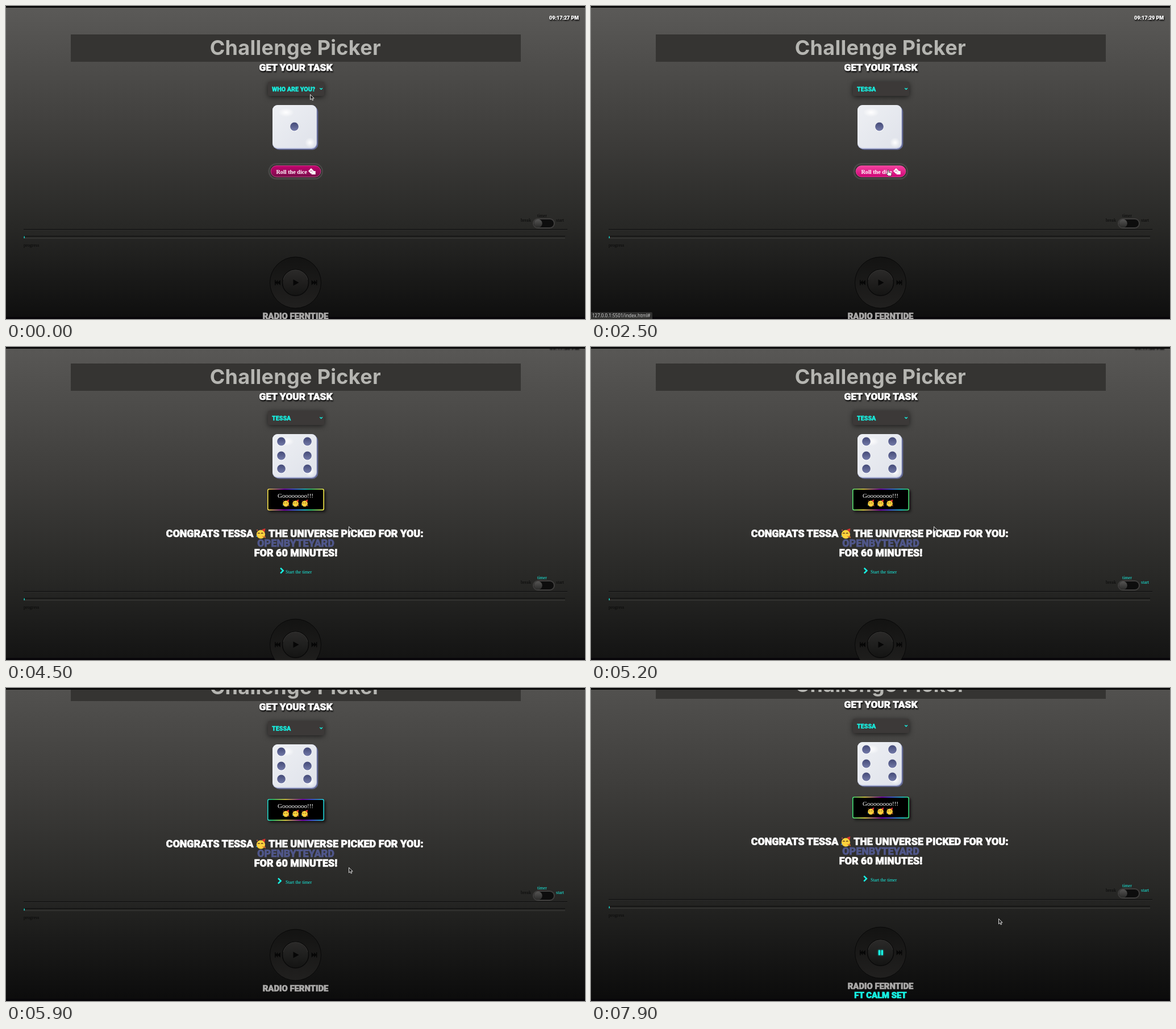
Recreate the animation shown at these times as an HTML page. Size 1019 by 550 pixels, loop 8000 ms.

```html
<!DOCTYPE html>
<html lang="en">
<head>
<meta charset="utf-8">
<title>Challenge Picker</title>
<style>
html, body { margin: 0; width: 100%; height: 100%; overflow: hidden; background: #111; }
svg#stage { display: block; width: 100vw; height: 100vh; }
text { font-family: "Liberation Serif", serif; font-size: 8.1px; fill: #080808; white-space: pre; }
.mid { text-anchor: middle; }
.end { text-anchor: end; }
.fat { font-family: Roboto, Inter, sans-serif; font-weight: 900; fill: #fff; stroke: #fff; stroke-width: .7; }
.cyan { fill: #17f3e4; stroke: #17f3e4; }
text.small { font-size: 10.7px; stroke-width: .3; }
text.head { font-size: 17.3px; filter: drop-shadow(1px 2px 1px #000); }
text.clock { font-size: 8.9px; stroke-width: .2; filter: drop-shadow(1px 2px 1px #000); }
text.big { font-size: 17.9px; }
text.task { fill: #50578a; stroke: #50578a; }
text.radio { font-size: 14.8px; fill: #aaa9a8; stroke: #aaa9a8; }
text.radio.cyan { fill: #17f3e4; stroke: #17f3e4; }
text.title { font: 700 36px Inter, sans-serif; letter-spacing: .3px; fill: #b5b5b1; }
text.roll { font-size: 10.2px; font-weight: bold; fill: #fff; }
text.go { font-size: 11px; fill: #fff; }
text.url { font: 8px "Noto Sans", sans-serif; fill: #cfcfcf; }
.on { fill: #17f3e4; }
.line { fill: none; stroke-width: 1.4; }
</style>
</head>
<body>
<svg id="stage" viewBox="0 0 1019 550" preserveAspectRatio="none">
  <defs>
    <linearGradient id="bg" x2="0" y2="1">
      <stop stop-color="#5b5a58"/><stop offset=".4" stop-color="#3e3d3b"/>
      <stop offset=".68" stop-color="#282826"/><stop offset=".82" stop-color="#1b1b1a"/>
      <stop offset="1" stop-color="#0b0b0b"/>
    </linearGradient>
    <linearGradient id="face" x2="1" y2="1">
      <stop stop-color="#eef0f4"/><stop offset="1" stop-color="#dfe2ea"/>
    </linearGradient>
    <radialGradient id="shine"><stop stop-color="#fff"/><stop offset="1" stop-color="#fff" stop-opacity="0"/></radialGradient>
    <linearGradient id="dot" x2="0" y2="1"><stop stop-color="#444a78"/><stop offset="1" stop-color="#737aa8"/></linearGradient>
    <linearGradient id="pink" x2="0" y2="1"><stop stop-color="#c4036f"/><stop offset="1" stop-color="#760c49"/></linearGradient>
    <linearGradient id="hot" x2="0" y2="1"><stop stop-color="#f4429f"/><stop offset="1" stop-color="#cf0576"/></linearGradient>
    <linearGradient id="knob" x2="0" y2="1"><stop stop-color="#565554"/><stop offset="1" stop-color="#2a2a29"/></linearGradient>
    <linearGradient id="disc" x2="0" y2="1"><stop stop-color="#131312"/><stop offset="1" stop-color="#21201f"/></linearGradient>
    <linearGradient id="core" x2="0" y2="1"><stop stop-color="#2b2a29"/><stop offset="1" stop-color="#141413"/></linearGradient>
    <linearGradient id="rainbow" gradientUnits="userSpaceOnUse" x1="460" x2="560" y1="0" y2="0" spreadMethod="repeat">
      <stop stop-color="#ffee4a"/><stop offset=".3" stop-color="#8a00c8"/><stop offset=".47" stop-color="#4a62ff"/>
      <stop offset=".66" stop-color="#22d6e6"/><stop offset=".77" stop-color="#34e07c"/><stop offset="1" stop-color="#ffee4a"/>
    </linearGradient>
    <g id="pip">
      <circle cy=".6" r="7.9" fill="#fff"/><circle r="7.4" fill="url(#dot)"/>
    </g>
    <g id="party">
      <circle cx="-.5" cy="1" r="6.6" fill="#ffd23c"/>
      <path d="M1-6.3 6.5-8 5.5-2Z" fill="#d9342f"/>
      <path d="M-5 0q1.5-2 3 0M0 0q1.5-2 3 0" stroke="#4a3020" class="line" style="stroke-width:1"/>
      <path d="M1 4 7 7 6.5 4Z" fill="#d0662c"/>
      <circle cx="-6" cy="-5.5" r=".9" fill="#e05a4a"/><circle cx="-7" cy="4" r=".9" fill="#3fa2e8"/>
    </g>
    <path id="skip" d="M-5-4.5h1.6v3.8L.4-4.5v3.8L5-4.5v9L.4.7v3.8L-3.4.7v3.8H-5Z" fill="#060606"/>
  </defs>

  <g id="back">
    <rect id="paper" width="1019" fill="url(#bg)"/>
  </g>
  <rect y="546.5" width="1019" height="4" fill="#070509"/>

  <g id="page">
    <text id="clock" class="fat clock end" x="1008" y="23.5"></text>
    <rect x="114" y="50" width="792" height="48" fill="#353432"/>
    <text class="title mid" x="509.3" y="85.5">Challenge Picker</text>
    <text class="fat head mid" x="510" y="113.5">GET YOUR TASK</text>

    <rect x="461" y="133" width="99" height="25" rx="3" fill="#3c3938" style="filter:drop-shadow(0 2px 5px #0009)"/>
    <text id="who" class="fat small cyan" x="468" y="149.7"></text>
    <path d="m552.3 144.3 2.3 2.3 2.3-2.3" class="line" stroke="#17f3e4"/>

    <rect x="471" y="176" width="78.3" height="76.7" rx="10" fill="#626994"/>
    <rect x="469" y="174" width="78" height="77" rx="9" fill="#b9c0e0"/>
    <rect x="469" y="174" width="77.5" height="75.5" rx="9" fill="url(#face)"/>
    <ellipse cx="493" cy="187" rx="14" ry="8" fill="url(#shine)"/>
    <circle cx="535" cy="240" r="9" fill="url(#shine)"/>
    <g id="one"><use href="#pip" x="507.5" y="212"/></g>
    <g id="six"></g>

    <g id="button">
      <rect x="461.5" y="276" width="96.5" height="29" rx="14.5" fill="#494847"/>
      <rect x="464.5" y="279" width="91" height="23" rx="11.5" fill="#242322"/>
      <rect id="pill" x="466" y="280.5" width="88" height="20" rx="10" stroke="#e268a8" stroke-width=".7"/>
      <text class="roll" x="475.5" y="294.5">Roll the dice</text>
      <path d="m537 285 5 5-5 5-5-5ZM542 290h2.7v6h-7v-1Z" fill="#fff"/>
      <g fill="#a00860"><circle cx="537" cy="290" r=".8"/><circle cx="535" cy="290" r=".6"/><circle cx="539" cy="290" r=".6"/></g>
    </g>

    <g id="result">
      <rect x="460.8" y="270.8" width="98.4" height="36.6" rx="2.5" fill="#000" stroke="url(#rainbow)" stroke-width="1.6" style="filter:drop-shadow(3px 3px 2px #0009)"/>
      <text class="go mid" x="509.5" y="286.3">Goooooooo!!!</text>
      <use href="#party" transform="translate(493 295.5) scale(.8)"/>
      <use href="#party" transform="translate(510 295.5) scale(.8)"/>
      <use href="#party" transform="translate(526 295.5) scale(.8)"/>
      <text class="fat big end" x="435.5" y="354.5">CONGRATS TESSA</text>
      <use href="#party" transform="translate(449 349) scale(1.15)"/>
      <text class="fat big" x="462" y="354.5">THE UNIVERSE PICKED FOR YOU:</text>
      <text class="fat big task mid" x="510" y="372">OPENBYTEYARD</text>
      <text class="fat big mid" x="510" y="389.3">FOR 60 MINUTES!</text>
      <path id="arrow" d="m-2.5-4.7 4.7 4.7-4.7 4.7" class="line" stroke="#17f3e4" style="stroke-width:2.5"/>
      <text class="on" x="492" y="419">Start the timer</text>
    </g>

    <g id="low">
      <text id="timer" class="mid" x="943.5" y="371">timer</text>
      <text x="906" y="379.3">break</text>
      <text id="start" x="968" y="379.3">start</text>
      <rect x="928" y="374" width="37" height="16" rx="8" fill="#0d0d0d" stroke="#3f3e3d" stroke-width="2"/>
      <circle cx="936.5" cy="382" r="7.3" fill="url(#knob)"/>
      <path d="M31 392.5H988M31 404.5H984" stroke="#0c0c0c"/>
      <path d="M31 393.5H988" stroke="#2c2c2b"/>
      <path d="M31 408H984" stroke="#41403f"/>
      <path d="M32.2 404.5v3.5" stroke="#17f3e4" stroke-width="1.3"/>
      <text x="31" y="423">progress</text>

      <circle cx="509.5" cy="486" r="45" fill="url(#disc)" stroke="#080808"/>
      <circle cx="509.5" cy="486" r="23" fill="url(#core)" stroke="#0a0a0a" stroke-width="1.5"/>
      <path d="M488 481a22 22 0 0 1 43 0" fill="none" stroke="#3b3a39" stroke-width=".8"/>
      <use href="#skip" x="478" y="486"/>
      <use href="#skip" transform="translate(542.5 486) scale(-1 1)"/>
      <path id="play" d="m505.5 480.5 10 5.5-10 5.5Z" fill="#060606"/>
      <g id="playing">
        <path d="M505.8 481.5h3.3v9h-3.3ZM510.7 481.5h3.3v9h-3.3Z" fill="#17f3e4" style="filter:drop-shadow(0 0 1.5px #17f3e4aa)"/>
        <text class="fat radio cyan mid" x="509.5" y="566">FT CALM SET</text>
      </g>
      <text class="fat radio mid" x="509.5" y="550">RADIO FERNTIDE</text>
    </g>
  </g>

  <g id="list">
    <rect x="461" y="158" width="98" height="47" fill="#3c3938"/>
    <rect id="pick" x="461" width="98" height="16" fill="#5a5655"/>
    <text class="fat small cyan" x="468" y="170">WHO ARE YOU?</text>
    <text class="fat small cyan" x="468" y="185.7">TESSA</text>
    <text class="fat small cyan" x="468" y="201.4">BRUNA</text>
  </g>

  <g id="status">
    <path d="M0 538H106q2 0 2 2V550H0Z" fill="#30302f"/>
    <text class="url" x="2" y="547">127.0.0.1:5501/index.html#</text>
  </g>
  <rect width="1019" height="3" fill="#0b0b0b"/>

  <path id="mouse" d="M.5.5v9.2l2.2-2 1.5 3.2 1.5-.7-1.4-3.1h2.9Z" fill="#222" stroke="#eee" stroke-width=".9"/>
  <path id="hand" d="M1 .5q1-1 2 0v3.7l4 .8q1 .4 1 1.6l-.6 4H2.4L-1.6 6.6q.6-1.4 2.6.2Z" fill="#fff" stroke="#222" stroke-width=".7"/>
</svg>
<script>
const $ = id => document.getElementById(id);
const show = (id, on) => $(id).style.display = on ? "" : "none";
const move = (id, x, y) => $(id).setAttribute("transform", `translate(${x} ${y})`);
const within = (t, a, b) => t >= a && t < b;

// linear interpolation between rows of [time, value, ...]
function at(keys, t) {
  const i = keys.findIndex(k => k[0] > t);
  if (i == 0) return keys[0].slice(1);
  if (i < 0) return keys.at(-1).slice(1);
  const a = keys[i - 1], b = keys[i], p = (t - a[0]) / (b[0] - a[0]);
  return a.slice(1).map((v, j) => v + (b[j + 1] - v) * p);
}

const shortPage = 571, growth = 58; // page height, and what the result adds to it
const scroll = [[2900, 0], [3000, 4], [3100, 15], [3200, 21], [5600, 21], [5700, 23], [5800, 50], [5900, 75], [6000, 79]];
const hue = [[4500, 0], [5700, -138], [5900, -168], [7900, -478]];
const pointer = [
  [599, 535, 155], [600, 535, 142], [1000, 535, 142], [1300, 535, 183], [1700, 535, 183],
  [1900, 521, 288], [2500, 521, 288], [2900, 603, 315], [6200, 603, 315],
  [6700, 510, 463], [7200, 510, 463], [7700, 717, 405]
];

$("six").innerHTML = [484.5, 530.5].map(x =>
  [187, 212, 235].map(y => `<use href="#pip" x="${x}" y="${y}"/>`).join("")).join("");

function draw(now) {
  const t = Math.floor(now % 8000 / 100) * 100;
  const done = t >= 4500, hover = within(t, 1900, 2700), music = t >= 6900;
  const hand = hover || within(t, 6600, 7300);
  const extra = done ? growth : 0, top = at(scroll, t)[0];

  move("back", 0, -top);
  move("page", 0, -top);
  move("low", 0, extra);
  $("paper").setAttribute("height", shortPage + extra);
  $("clock").textContent = `09:17:${27 + Math.min(3, Math.floor((t + 100) / 1000))} PM`;
  $("who").textContent = t < 1800 ? "WHO ARE YOU?" : "TESSA";

  show("list", within(t, 900, 1800));
  $("pick").setAttribute("y", t < 1200 ? 158 : 174);
  show("status", within(t, 2300, 2900));
  $("pill").setAttribute("fill", hover ? "url(#hot)" : "url(#pink)");

  show("one", !done);
  show("six", done);
  show("button", !done);
  show("result", done);
  $("timer").classList.toggle("on", done);
  $("start").classList.toggle("on", t >= 4600);
  $("rainbow").setAttribute("gradientTransform", `translate(${at(hue, t)[0]})`);
  move("arrow", 483.5 + 2.1 * Math.cos((t - 4500) / 2600 * 2 * Math.PI), 414);

  show("play", !music);
  show("playing", music);
  const [x, y] = at(pointer, t);
  move("mouse", x, y);
  move("hand", x, y);
  show("mouse", !hand);
  show("hand", hand);
}

const begin = performance.now();
(function tick() {
  draw(performance.now() - begin);
  requestAnimationFrame(tick);
})();
</script>
</body>
</html>
```
